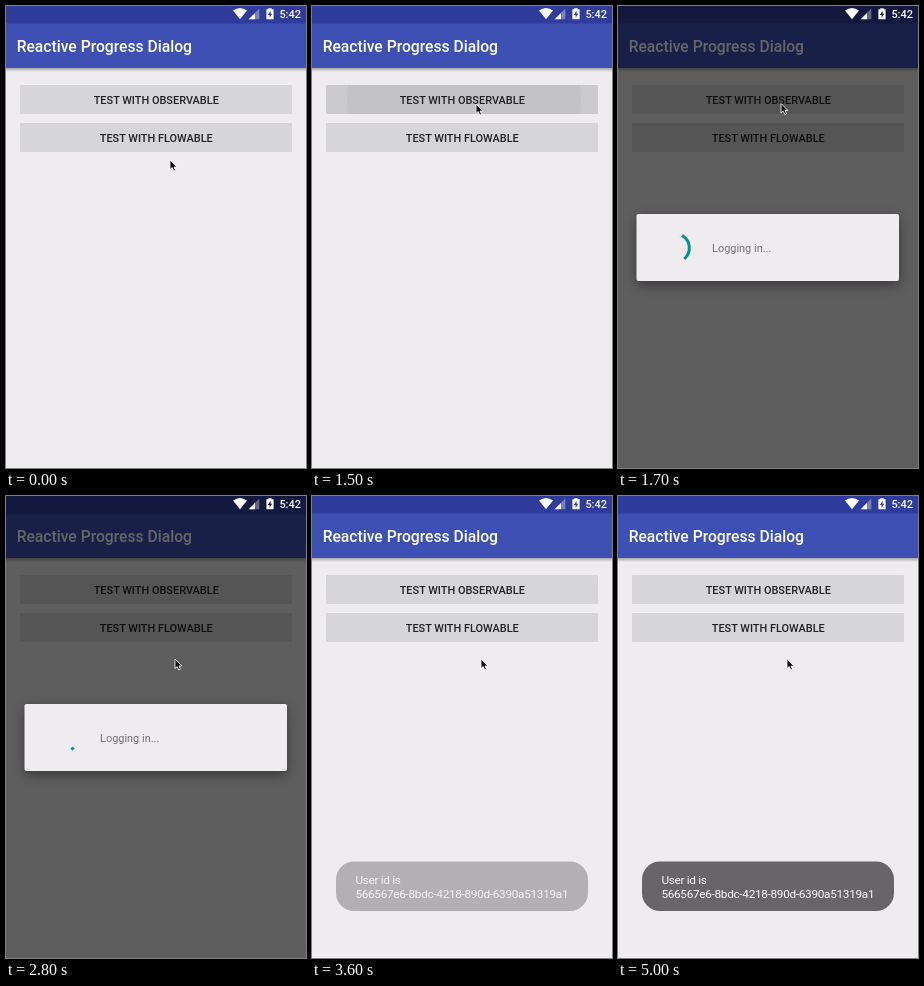
An HTML page for the animation above (5.1 s loop, 300 px wide and 462 px high).

```html
<!DOCTYPE html>
<html lang="en">
<head>
<meta charset="utf-8">
<title>Progress dialog</title>
<style>
  html, body { margin: 0; width: 100%; height: 100%; overflow: hidden; background: #eeecef; }
  svg { display: block; width: 300px; height: 462px; font-family: Roboto, sans-serif; }
  .medium { font-weight: 500; }
  .label { font-size: 10.94px; text-anchor: middle; fill: #212121; }
  .button { fill: #d6d5d7; filter: drop-shadow(0 .7px .6px rgba(0, 0, 0, .22)); }
  .panel { fill: #eeecef; filter: drop-shadow(0 4px 6px rgba(0, 0, 0, .4)); }
  .toast { font-size: 11.8px; letter-spacing: -.31px; fill: #fafafa; }
</style>
</head>
<body>
<svg viewBox="0 0 300 462">
  <defs>
    <linearGradient id="shade" x2="0" y2="1">
      <stop stop-color="#000" stop-opacity=".3"/>
      <stop offset="1" stop-color="#000" stop-opacity="0"/>
    </linearGradient>
    <clipPath id="press"><rect x="14" y="79" width="272" height="29" rx="2"/></clipPath>
  </defs>

  <!-- Screen -->
  <rect width="300" height="462" fill="#eeecef"/>
  <rect y="62" width="300" height="4" fill="url(#shade)"/>
  <rect width="300" height="62" fill="#3f50b5"/>
  <rect width="300" height="17.5" fill="#303c9c"/>
  <text class="medium" x="10.7" y="46" font-size="15.65" fill="#fff">Reactive Progress Dialog</text>

  <rect class="button" x="14" y="79" width="272" height="29" rx="2"/>
  <g id="ripple" clip-path="url(#press)">
    <rect x="14" y="79" width="272" height="29" fill-opacity=".055"/>
    <circle id="wave" cy="94" fill="#080400" fill-opacity=".035"/>
  </g>
  <text class="label medium" x="150.3" y="97.8">TEST WITH OBSERVABLE</text>
  <rect class="button" x="14" y="117" width="272" height="29" rx="2"/>
  <text class="label medium" x="150.3" y="135.8">TEST WITH FLOWABLE</text>

  <rect id="dim" width="300" height="462"/>

  <!-- Status icons stay bright above the dim layer -->
  <g fill="#fff">
    <path d="M234 13.3 L227 4.6 Q234 -.6 241 4.6Z"/>
    <path d="M253.3 2.6 V13.2 H242.7Z" opacity=".35"/>
    <path d="M249 6.9 V13.2 H242.7Z"/>
    <path fill-rule="evenodd" d="M262.3 2.2 H265.7 V3.3 H267.6 V13.3 H260.4 V3.3 H262.3Z M264.6 4.8 L261.9 9 H263.6 V11.8 L266.2 7.7 H264.6Z"/>
    <text class="medium" x="273.4" y="12" font-size="10.94">5:42</text>
  </g>

  <g id="dialog">
    <rect class="panel" x="18.5" y="208" width="262.5" height="67" rx="2"/>
    <path id="arc" fill="none" stroke="#009688" stroke-width="3" stroke-linecap="square"/>
    <text x="94" y="246" font-size="10.94" fill="#747375">Logging in...</text>
  </g>

  <g id="toast">
    <rect x="24" y="365.5" width="252" height="49.5" rx="18" fill="#676567"/>
    <text class="toast" x="43.4" y="388">User id is</text>
    <text class="toast" x="43.4" y="402.4">566567e6-8bdc-4218-890d-6390a51319a1</text>
  </g>

  <path id="cursor" d="M0 0 V9.6 L2.2 7.6 L3.8 11 L5.5 10.2 L4 7 H6.9Z" fill="#111" stroke="#fff" stroke-width=".8"/>
</svg>
<script>
  const LOOP = 5100, STEP = 100, SPIN_START = 1500, SPIN_CYCLE = 1333, SPIN_TURN = 3332.5;
  const $ = id => document.getElementById(id);

  // Linear interpolation through [time, value] stops
  function track(t, stops) {
    let [t0, v0] = stops[0];
    for (const [t1, v1] of stops) {
      if (t < t1) return t <= t0 ? v0 : v0 + (v1 - v0) * (t - t0) / (t1 - t0);
      [t0, v0] = [t1, v1];
    }
    return v0;
  }

  // Cubic Bezier easing for x in 0..1, solved by bisection
  function bezier(x, x1, y1, x2, y2) {
    const at = (s, a, b) => 3 * (1 - s) * (1 - s) * s * a + 3 * (1 - s) * s * s * b + s ** 3;
    let lo = 0, hi = 1;
    for (let i = 0; i < 24; i++) {
      const mid = (lo + hi) / 2;
      if (at(mid, x1, x2) < x) lo = mid; else hi = mid;
    }
    return at(hi, y1, y2);
  }

  // The head runs ahead in the first half of a cycle, the tail catches up in the second
  function spinner(t) {
    const p = t % SPIN_CYCLE / SPIN_CYCLE;
    const head = p < .5 ? bezier(p * 2, .4, 0, .2, 1) : 1;
    const tail = p > .5 ? bezier(p * 2 - 1, .4, 0, .2, 1) : 0;
    const base = t / SPIN_TURN + p / 4;
    const from = base + tail * .75;
    const to = Math.max(base + head * .75, from + .002);
    const point = turn => {
      const a = turn * 2 * Math.PI;
      return `${57 + 14.3 * Math.sin(a)} ${242 - 14.3 * Math.cos(a)}`;
    };
    return `M${point(from)} A14.3 14.3 0 ${to - from > .5 ? 1 : 0} 1 ${point(to)}`;
  }

  function draw(t) {
    const x = track(t, [[0, 164], [1600, 164], [1700, 163], [1900, 163], [2400, 169]]);
    const y = track(t, [[0, 154], [200, 154], [600, 113], [1000, 98], [1600, 98], [1700, 97.5], [1900, 97.5], [2400, 163]]);
    $('cursor').setAttribute('transform', `translate(${x} ${y})`);

    $('ripple').style.opacity = track(t, [[1300, 0], [1400, 1], [1500, 1], [1700, 0]]);
    $('wave').setAttribute('cx', track(t, [[1300, 164], [1500, 152], [1600, 150]]));
    $('wave').setAttribute('r', track(t, [[1300, 0], [1500, 117], [1600, 150]]));

    $('dim').style.opacity = track(t, [[1500, 0], [1700, .6], [3400, .6], [3600, 0]]);
    $('dialog').style.opacity = track(t, [[1500, 0], [1700, 1], [3400, 1], [3500, .05], [3600, 0]]);
    $('arc').setAttribute('d', spinner(Math.max(0, t - SPIN_START)));

    $('toast').style.opacity = track(t, [[3400, 0], [3500, .08], [3600, .44], [3700, .75], [3800, .92], [3900, 1]]);
  }

  function tick() {
    draw(Math.floor(performance.now() % LOOP / STEP) * STEP);
    requestAnimationFrame(tick);
  }
  tick();
</script>
</body>
</html>
```
